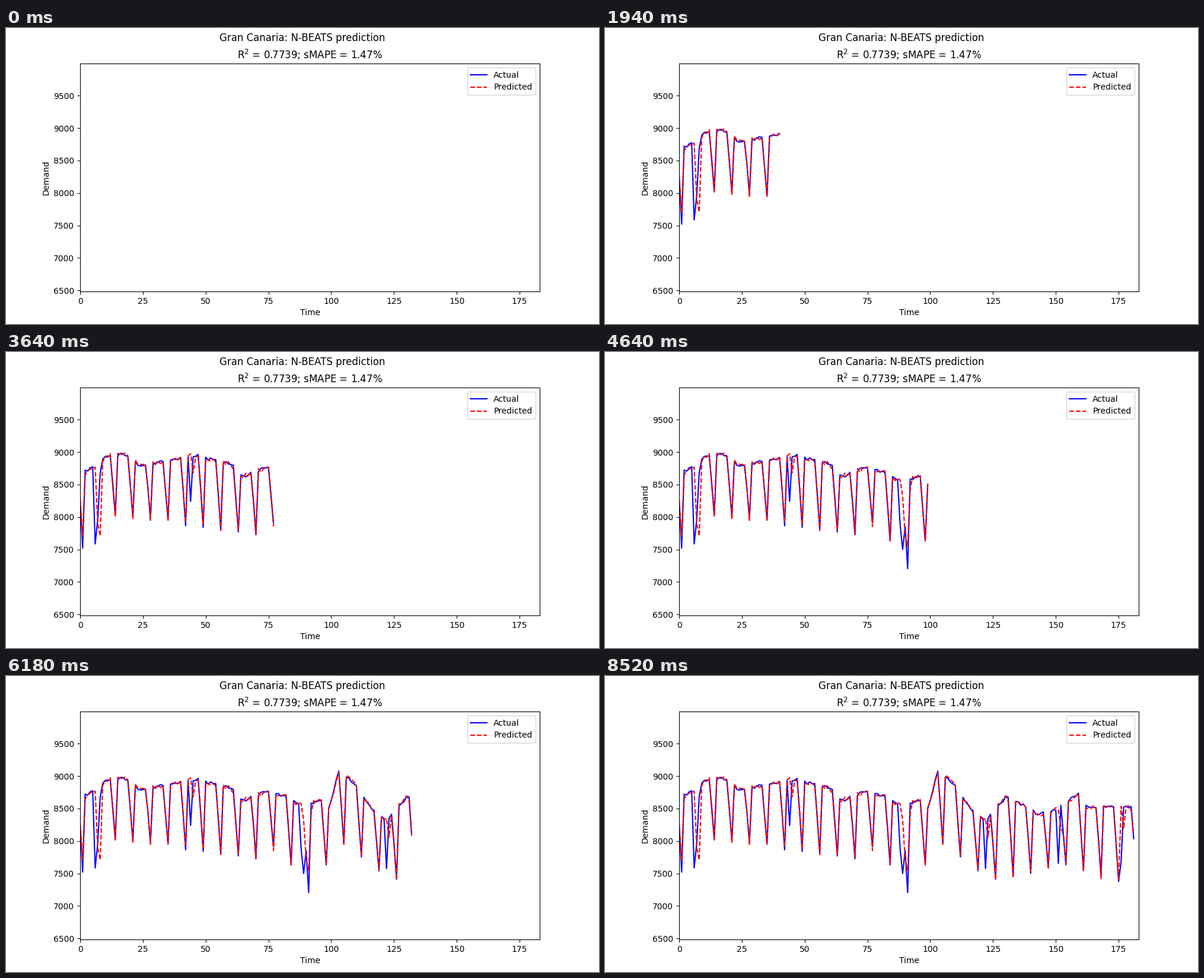
A matplotlib script for the animation above (8620 ms loop, 1000x500 px).

```python
import numpy as np
import matplotlib.pyplot as plt
from matplotlib.animation import FuncAnimation

TICK = 20      # ms per animation frame
LOOP = 8620    # ms per loop
HOLD = 120     # ms before the lines start growing
DAYS = 182
LOWEST, HIGHEST = 7204, 9086

# Key points (day: demand), joined by straight lines.
WORKDAY_TREND = {2: 8700, 11: 8940, 18: 8960, 24: 8785, 46: 8950, 60: 8810, 65: 8620,
                 74: 8770, 82: 8690, 88: 8540, 96: 8630, 99: 8500, 103: HIGHEST,
                 110: 8860, 114: 8590, 122: 8310, 130: 8670, 138: 8540, 143: 8400,
                 150: 8480, 159: 8730, 162: 8530, 180: 8510}
SUNDAY_TREND = {1: 7720, 8: 7850, 14: 8000, 28: 7980, 42: 7880, 70: 7740, 77: 7900,
                84: 7640, 98: 7610, 105: 7950, 119: 7520, 126: 7410, 154: 7620,
                175: 7370, 182: 7560}
# Days on which the demand leaves the weekly pattern, mostly holidays.
UNUSUAL = {1: 7520, 6: 7585, 7: 7960, 8: 8680, 44: 8240, 88: 7880, 89: 7500, 90: 7850,
           91: LOWEST, 122: 7575, 151: 7655, 176: 7680}


def trend(points, days):
    return np.interp(days, list(points), list(points.values()))


def weekly_pattern(days):
    """Flat working days, a Sunday low and a Saturday halfway down to it."""
    sundays = np.array([1, 8, *range(14, DAYS + 1, 7)])
    demand = trend(WORKDAY_TREND, days)
    demand[sundays] = trend(SUNDAY_TREND, sundays)
    demand[sundays - 1] = (demand[sundays - 1] + demand[sundays]) / 2 + 25
    return demand


def make_series():
    rng = np.random.default_rng(4)
    usual = weekly_pattern(np.arange(DAYS + 1))[:DAYS]
    actual = usual + rng.uniform(-25, 25, DAYS)
    actual[list(UNUSUAL)] = list(UNUSUAL.values())

    # The forecast misses a sudden dip and partly repeats it a day later.
    dips = np.minimum(actual - usual, 0)
    predicted = usual + rng.uniform(-40, 40, DAYS)
    predicted[1:] += 0.4 * dips[:-1]
    return actual, predicted


actual, predicted = make_series()
days = np.arange(DAYS)

plt.rcParams["font.family"] = "DejaVu Sans"
fig, ax = plt.subplots(figsize=(10, 5), dpi=100)
fig.suptitle("Gran Canaria: N-BEATS prediction", y=0.983)
ax.set_title("R$^2$ = 0.7739; sMAPE = 1.47%", pad=5.4)
ax.set_xlabel("Time")
ax.set_ylabel("Demand")
ax.set_xlim(0, DAYS + 1)
ax.set_ylim(0.9 * LOWEST, 1.1 * HIGHEST)

actual_line, = ax.plot([], [], "b-", label="Actual")
predicted_line, = ax.plot([], [], "r--", label="Predicted")
ax.legend(loc="upper right")


def visible_days(ms):
    """Days shown so far: three new ones per 140 ms, held 20, 20 and 100 ms."""
    if ms < HOLD:
        return 1
    cycle, rest = divmod(ms - HOLD, 140)
    return 3 * cycle + min(rest // 20, 2) + 2


def update(frame):
    n = visible_days(frame * TICK)
    actual_line.set_data(days[:n], actual[:n])
    predicted_line.set_data(days[:n], predicted[:n])
    return actual_line, predicted_line


anim = FuncAnimation(fig, update, frames=LOOP // TICK, interval=TICK,
                     repeat=True, repeat_delay=0)
plt.show()
```
